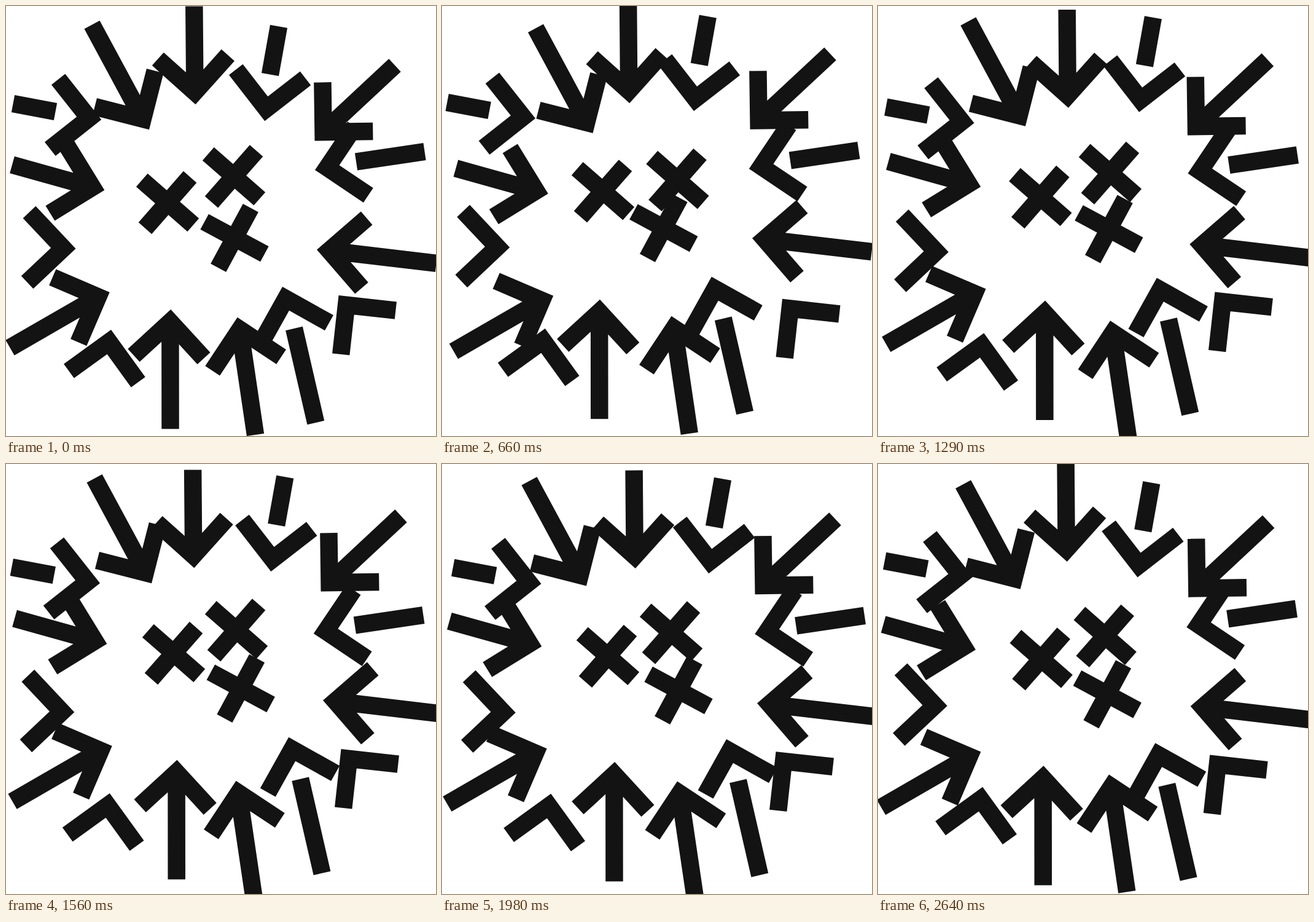
Animation of 700x700 px, one loop 2670 ms. Source, as an HTML page:

```html
<!DOCTYPE html>
<html lang="en">
<head>
<meta charset="utf-8">
<title>Arrows</title>
<style>
html, body { margin: 0; height: 100%; overflow: hidden; background: #fff; }
svg { display: block; width: 100vw; height: 100vh; }
path { fill: none; stroke: #131313; stroke-width: 28.5; stroke-miterlimit: 10; }
</style>
</head>
<body>
<svg viewBox="0 0 700 700"></svg>
<script>
const LOOP = 2670, STEP = 30, HALF = 14.25, ARM = 80.75, SPOKE = 55.5;

const polar = (r, deg) => [r * Math.cos(deg * Math.PI / 180), r * Math.sin(deg * Math.PI / 180)];
const bar = (x1, y1, x2, y2) => `M${x1} ${y1}L${x2} ${y2}`;

// Where the centre lines of a right-angled head meet, given its outer tip
function elbow(x, y, deg) {
  const [c, s] = polar(HALF, deg);
  return [x + c - s, y + s + c];
}

// Head with its outer tip at x, y; the second arm is a quarter turn on
function chevron(x, y, deg) {
  const [vx, vy] = elbow(x, y, deg), [c, s] = polar(ARM, deg);
  return bar(vx + c, vy + s, vx, vy) + `L${vx - s} ${vy + c}`;
}

const arrow = (x, y, deg, tailX, tailY) =>
  chevron(x, y, deg) + bar(tailX, tailY, ...elbow(x, y, deg));

function cross(x, y, deg) {
  const [c, s] = polar(SPOKE, deg);
  return bar(x - c, y - s, x + c, y + s) + bar(x + s, y - c, x - s, y + c);
}

// Each group drifts as one piece through its stops, reached at shared times
const times = [0, 390, 660, 1020, 1560, 1980, 2640];
const groups = [
  {
    shapes: [
      arrow(233, 201.2, 194.3, 140, 30.5),
      arrow(160.3, 299.7, 148.4, 10, 258.5),
      arrow(168.7, 466, 113.2, 6.5, 556.3),
      chevron(541.5, 471, 6.3),
      cross(371, 277.3, 41.2)
    ],
    stops: [[0, 0], [8, 3], [12.5, 5.8], [10, -2], [4, -7], [2, -2.8], [-1.3, 2.6]]
  },
  {
    shapes: [
      arrow(308.5, 160.3, 221.9, 306.3, 0.5),
      arrow(376.7, 506.8, 33.5, 406, 698),
      chevron(503, 267, 303.9),
      chevron(171, 527, 54.1),
      chevron(113.5, 395, 136.7),
      chevron(155.2, 185.1, 141.7),
      bar(570, 253.5, 681.5, 237),
      bar(11.5, 159, 80.5, 172)
    ],
    stops: [[0, 0], [-6.6, -2], [-3.2, -2], [5, 1.5], [-2.2, 9], [6.3, 9.8], [-0.7, -1.3]]
  },
  {
    shapes: [
      arrow(502.5, 219.5, 269.2, 633, 96.5),
      arrow(506, 396.8, 319.1, 700.5, 418.8),
      cross(263, 320, 41.2)
    ],
    stops: [[0, 0], [1, -17], [-1, -18.7], [-7, -7], [10, -12], [7, -7.2], [2.7, -2.6]]
  },
  {
    shapes: [
      arrow(268.2, 494, 47.4, 267.5, 688.5),
      chevron(421.2, 187.3, 232.2),
      chevron(450, 457, 29.2),
      bar(444, 33.3, 430, 111.5),
      bar(469, 525, 504.3, 678.3),
      cross(372, 377.5, 28.3)
    ],
    stops: [[0, 0], [-10, -12], [-11.2, -16.2], [-3.3, -16.3], [10.2, -12.2], [13, -9], [1.3, -2.7]]
  }
];

// Smooth curve through the stops, with slopes taken from the neighbours
function position(stops, t) {
  const last = times.length - 1;
  const i = Math.max(0, times.findLastIndex((at, k) => k < last && at <= t));
  const span = times[i + 1] - times[i], u = (t - times[i]) / span, v = 1 - u;
  return [0, 1].map(axis => {
    const slope = k => {
      const a = Math.max(k - 1, 0), b = Math.min(k + 1, last);
      return (stops[b][axis] - stops[a][axis]) / (times[b] - times[a]);
    };
    return v * v * (1 + 2 * u) * stops[i][axis] + u * u * (1 + 2 * v) * stops[i + 1][axis]
      + span * u * v * (v * slope(i) - u * slope(i + 1));
  });
}

const svg = document.querySelector('svg');
for (const group of groups) {
  group.el = document.createElementNS(svg.namespaceURI, 'path');
  group.el.setAttribute('d', group.shapes.join(''));
  svg.append(group.el);
}

const start = performance.now();
function draw(now) {
  const t = Math.floor((Math.max(0, now - start) % LOOP) / STEP) * STEP;
  for (const { el, stops } of groups) {
    el.setAttribute('transform', `translate(${position(stops, t)})`);
  }
  requestAnimationFrame(draw);
}
draw(start);
</script>
</body>
</html>
```
